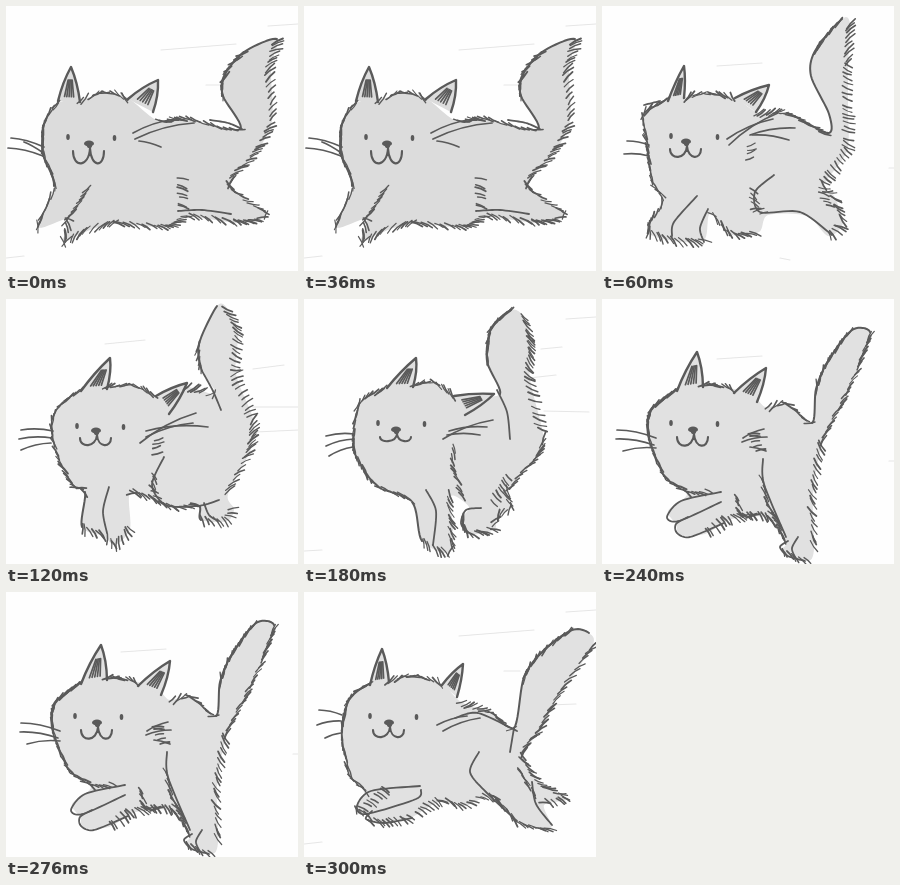
An HTML page with a canvas that plays this animation: 292x265 px, repeating every 0.36 s.

```html
<!DOCTYPE html>
<html lang="en">
<head>
<meta charset="utf-8">
<title>Running cat</title>
<style>
html, body { margin: 0; width: 100%; height: 100%; overflow: hidden; background: #fefefe; }
canvas { display: block; }
</style>
</head>
<body>
<canvas id="stage" width="292" height="265"></canvas>
<script>
const ctx = document.getElementById('stage').getContext('2d');
const INK = '#5a5a5a', STEP = 60, PER = 10;
let coat, shape, seed;

const nums = s => s.split(' ').map(Number);
const mix = (a, b, t) => a + (b - a) * t;
const random = () => (seed = seed * 16807 % 2147483647) / 2147483647;

// Smooth curve through x y pairs, PER points for each span
function curve(text, closed) {
  const v = nums(text), n = v.length / 2, out = [];
  const at = i => {
    const k = closed ? (i + n) % n : Math.max(0, Math.min(n - 1, i));
    return [v[2 * k], v[2 * k + 1]];
  };
  for (let i = 0; i < (closed ? n : n - 1); i++) {
    const [a, b, c, d] = [at(i - 1), at(i), at(i + 1), at(i + 2)];
    for (let s = 0; s < PER; s++) {
      const t = s / PER, u = 1 - t;
      out.push([0, 1].map(k =>
        u * u * u * b[k] + 3 * u * u * t * (b[k] + (c[k] - a[k]) / 7) +
        3 * u * t * t * (c[k] - (d[k] - b[k]) / 7) + t * t * t * c[k]));
    }
  }
  if (!closed) out.push(at(n - 1));
  return out;
}

function trace(points) {
  ctx.beginPath();
  points.forEach(p => ctx.lineTo(...p));
}

function stroke(points, width = 1.8, color = INK) {
  trace(points);
  ctx.lineWidth = width;
  ctx.strokeStyle = color;
  ctx.stroke();
}

function body(color, text) {
  coat = color;
  shape = curve(text, true);
  trace(shape);
  ctx.fillStyle = coat;
  ctx.fill();
}

// Part of the body outline between two of its points
const part = (from, to) => shape.slice(from * PER, to * PER + 1);
const edge = (from, to) => stroke(part(from, to), 2);
const line = text => stroke(curve(text));
const streak = (x, y, x2, y2) => stroke([[x, y], [x2, y2]], 1.2, '#e6e6e6');

// Hairs along a curve, turned from its direction by a lean in degrees
function hairs(points, lean, end, size) {
  let gap = 0;
  ctx.strokeStyle = INK;
  for (let i = 1; i < points.length; i++) {
    const [x, y] = points[i], dx = x - points[i - 1][0], dy = y - points[i - 1][1];
    gap -= Math.hypot(dx, dy);
    if (gap > 0) continue;
    gap += 3.6 + random() * 1.8;
    const turn = mix(lean, end, i / points.length) + random() * 18 - 9;
    const angle = Math.atan2(dy, dx) + turn * Math.PI / 180;
    const half = size * (0.33 + random() * 0.22);
    const hx = Math.cos(angle) * half, hy = Math.sin(angle) * half;
    const px = x + random() * 2 - 1, py = y + random() * 2 - 1;
    ctx.lineWidth = 1.1 + random() * 0.8;
    ctx.beginPath();
    ctx.moveTo(px - hx, py - hy);
    ctx.quadraticCurveTo(px + hy * 0.2, py - hx * 0.2, px + hx, py + hy);
    ctx.stroke();
  }
}
const fur = (from, to, lean, end = lean) => hairs(part(from, to), lean, end, 12.5);
const tuft = (text, lean) => hairs(curve(text), lean, lean, 11);

function whisker(x, y, x2, y2) {
  const bow = (x2 - x) * 0.1 * Math.sign(y - y2 || 1);
  ctx.beginPath();
  ctx.moveTo(x, y);
  ctx.quadraticCurveTo((x + x2) / 2 - Math.abs(y2 - y) * 0.1, (y + y2) / 2 - Math.abs(bow), x2, y2);
  ctx.lineWidth = 1.7;
  ctx.strokeStyle = INK;
  ctx.stroke();
}

// Base, tip, base
function ear(ax, ay, tx, ty, bx, by) {
  const cx = (ax + tx + bx) / 3, cy = (ay + ty + by) / 3;
  const bulge = (p, q, c) => (p + q) / 2 + ((p + q) / 2 - c) * 0.35;
  ctx.beginPath();
  ctx.moveTo(ax, ay);
  ctx.quadraticCurveTo(bulge(ax, tx, cx), bulge(ay, ty, cy), tx, ty);
  ctx.quadraticCurveTo(bulge(bx, tx, cx), bulge(by, ty, cy), bx, by);
  ctx.fillStyle = coat;
  ctx.fill();
  ctx.lineWidth = 2.4;
  ctx.strokeStyle = INK;
  ctx.stroke();
  for (let k = 0.25; k < 0.8; k += 0.12) {
    const x = mix(ax, bx, k), y = mix(ay, by, k);
    stroke([0.14, 0.62].map(t => [mix(x, tx, t), mix(y, ty, t)]), 1.7);
  }
}

function dot(x, y, rx, ry) {
  ctx.beginPath();
  ctx.ellipse(x, y, rx, ry, 0, 0, 7);
  ctx.fillStyle = INK;
  ctx.fill();
}

// Left eye, nose, depth of the smile
function face(ex, ey, nx, ny, depth) {
  dot(ex, ey, 1.8, 3);
  dot(ex + 46.5, ey + 1, 1.8, 3);
  dot(nx, ny - 0.5, 5, 3);
  dot(nx + 0.5, ny + 1.5, 2.6, 2.6);
  const y = ny + 7, low = y + depth;
  ctx.beginPath();
  ctx.moveTo(nx - 16, y);
  ctx.bezierCurveTo(nx - 16, low, nx, low, nx + 1, ny + 4);
  ctx.bezierCurveTo(nx + 2, low, nx + 15, low, nx + 15, y);
  ctx.lineWidth = 2.1;
  ctx.strokeStyle = INK;
  ctx.stroke();
}

function wind() {
  streak(155, 44, 230, 38);
  streak(262, 20, 292, 18);
  streak(200, 79, 216, 79);
  streak(0, 252, 18, 250);
}

function crouch() {
  wind();
  body('#dcdcdc', '52 97 38 118 37 148 48 180 32 221 62 213 57 236 76 227 108 218 160 221 184 211 235 217 260 208 225 179 250 147 266 115 265 62 271 33 238 46 218 70 217 90 234 123 180 113 152 115 122 92 100 87 74 94');
  ear(52, 95, 65, 61, 74, 96);
  ear(122, 93, 152, 74, 147, 106);
  fur(0, 4, 0);
  fur(5, 8, -30);
  fur(8, 12, 25);
  fur(12, 13, -15);
  fur(13, 17, 18, 60);
  fur(18, 20, 8);
  fur(21, 23, 15);
  fur(24, 26, 35, -40);
  tuft('82 182 60 216', 10);
  tuft('176 172 177 203', -70);
  edge(17, 21);
  edge(1, 3);
  line('172 205 196 204 225 208');
  line('236 123 222 117 204 114');
  whisker(5, 132, 38, 141);
  whisker(2, 142, 37, 150);
  whisker(18, 136, 36, 146);
  whisker(127, 127, 170, 113);
  whisker(129, 133, 188, 117);
  whisker(133, 135, 155, 141);
  face(62, 131, 83, 138, 17);
}

function reach() {
  streak(115, 60, 160, 57);
  streak(287, 162, 292, 162);
  streak(178, 252, 188, 254);
  body('#e1e1e1', '65 94 42 108 45 138 50 175 60 194 45 225 72 235 102 234 108 208 130 229 157 226 166 209 205 210 226 230 241 217 232 190 222 179 245 145 246 105 246 60 248 18 240 13 213 45 209 70 227 108 226 127 185 107 155 106 133 92 105 87 83 91');
  ear(66, 95, 82, 60, 82, 92);
  ear(133, 92, 167, 79, 154, 106);
  fur(0, 5, -10);
  fur(5, 7, 45);
  fur(8, 10, 10, 35);
  fur(13, 14, 75);
  fur(14, 16, -40);
  fur(16, 19, -80, -65);
  fur(19, 20, 40);
  fur(21, 22, -5);
  fur(25, 27, 0, -45);
  fur(28, 30, 40, -45);
  tuft('152 185 153 200 164 209', -50);
  tuft('150 138 148 154', 65);
  tuft('221 188 228 200', -45);
  edge(21, 26);
  line('42 99 58 95');
  line('95 190 72 216 70 230');
  line('106 203 98 222 102 236');
  line('172 169 153 186 158 206 198 206 230 229');
  whisker(25, 135, 47, 139);
  whisker(22, 148, 47, 150);
  whisker(127, 139, 176, 107);
  whisker(125, 133, 171, 113);
  whisker(148, 129, 193, 122);
  whisker(150, 129, 187, 134);
  face(69, 130, 84, 136, 11);
}

function gather() {
  streak(99, 45, 139, 41);
  streak(247, 70, 278, 66);
  streak(247, 108, 292, 108);
  streak(250, 133, 292, 131);
  body('#e1e1e1', '75 91 48 115 47 145 65 184 79 193 76 228 97 237 109 246 124 230 124 195 148 201 170 209 193 207 195 221 221 222 228 210 222 195 245 150 247 120 230 75 232 32 221 9 211 7 193 45 196 72 210 95 181 88 163 98 150 97 128 87 102 87');
  ear(75, 92, 104, 59, 101, 90);
  ear(150, 97, 181, 84, 163, 115);
  fur(0, 4, -5, -15);
  fur(5, 7, 40);
  fur(7, 8, -68);
  fur(9, 12, 20);
  fur(13, 15, 45, 75);
  fur(16, 18, 20, 50);
  fur(18, 19, 80);
  fur(19, 21, -80, -20);
  fur(23, 24, 15);
  fur(25, 26, -45);
  fur(28, 30, 30, -30);
  tuft('149 176 147 190 153 201', -40);
  tuft('152 139 151 155', 70);
  edge(22, 24);
  line('196 72 207 92 215 111');
  line('103 188 97 212 101 234');
  line('158 158 146 186 160 206 192 207 213 201');
  line('198 204 203 216 212 222');
  edge(4, 5);
  edge(12, 13);
  whisker(15, 131, 47, 132);
  whisker(13, 140, 46, 139);
  whisker(15, 151, 45, 144);
  whisker(134, 144, 190, 114);
  whisker(140, 138, 187, 124);
  whisker(140, 132, 202, 128);
  face(71, 127, 90, 132, 10);
}

function turn() {
  streak(262, 20, 292, 18);
  streak(237, 50, 258, 48);
  streak(225, 79, 252, 76);
  streak(240, 112, 285, 113);
  streak(0, 252, 18, 251);
  body('#e0e0e0', '82 89 55 105 50 149 70 185 108 203 118 242 145 254 149 230 147 197 165 208 158 220 165 235 190 231 193 218 207 209 205 191 234 157 239 135 226 80 228 45 220 18 207 11 187 30 183 62 196 95 165 97 151 97 132 84 110 85');
  ear(83, 89, 112, 59, 109, 88);
  ear(150, 97, 190, 95, 161, 116);
  fur(0, 1, -20);
  fur(1, 4, 5);
  fur(5, 6, 40);
  fur(6, 8, -30);
  fur(10, 13, 0, 65);
  fur(13, 15, -30);
  fur(15, 17, 15);
  fur(17, 20, -65, -20);
  fur(21, 23, -8, 8);
  fur(26, 28, 35, -30);
  tuft('151 149 148 164 158 197', -25);
  tuft('189 206 205 178', -65);
  edge(21, 24);
  edge(4, 5);
  line('193 91 203 113 206 140');
  line('122 191 132 212 129 246');
  line('177 209 162 211 157 224 163 234');
  whisker(22, 137, 50, 135);
  whisker(22, 147, 50, 140);
  whisker(25, 157, 49, 148);
  whisker(139, 140, 189, 121);
  whisker(145, 132, 183, 128);
  whisker(143, 136, 176, 136);
  face(74, 124, 92, 131, 6);
}

function spring() {
  streak(115, 60, 160, 57);
  streak(287, 162, 292, 162);
  body('#e1e1e1', '74 91 48 113 47 140 63 178 85 195 66 212 74 225 78 236 103 235 130 220 165 219 184 243 180 252 205 262 212 250 211 195 220 146 240 105 260 60 268 33 250 31 226 62 214 90 210 124 185 105 164 108 154 100 132 90 101 86');
  ear(75, 92, 95, 53, 101, 88);
  ear(132, 94, 164, 69, 155, 103);
  fur(0, 4, -5);
  fur(8, 9, 84);
  fur(9, 10, 50);
  fur(10, 11, 10);
  fur(12, 13, 30);
  fur(14, 16, -30, -40);
  fur(16, 19, 14);
  fur(20, 22, -10);
  fur(23, 25, 0, -40);
  fur(27, 28, 45, -30);
  tuft('135 197 139 216 153 217', -20);
  tuft('160 179 165 204 179 230', -15);
  tuft('151 133 158 151', -75);
  tuft('88 195 110 193', 30);
  edge(19, 23);
  edge(0, 2);
  line('119 193 79 202 65 218 77 222 119 203');
  line('86 218 74 225 75 234 88 238 122 224');
  line('161 160 162 185 184 238');
  line('186 242 178 248 186 257 203 262');
  line('196 238 190 249 193 258');
  whisker(15, 131, 54, 139);
  whisker(14, 140, 52, 146);
  whisker(21, 152, 54, 149);
  whisker(141, 139, 162, 130);
  whisker(140, 143, 165, 138);
  whisker(148, 148, 164, 152);
  face(69, 124, 91, 131, 12);
}

function stretch() {
  wind();
  streak(245, 113, 272, 112);
  body('#e1e1e1', '65 92 45 108 38 140 45 181 60 200 52 216 64 223 66 230 100 229 135 210 160 214 188 205 214 231 247 236 240 213 263 207 236 190 219 163 237 138 252 108 288 55 285 41 268 38 240 58 220 85 210 136 186 120 157 110 138 92 110 84 85 88');
  ear(66, 93, 78, 57, 85, 90);
  ear(138, 93, 159, 72, 153, 105);
  fur(0, 4, 0, -10);
  fur(5, 6, 20);
  fur(7, 9, 40, 70);
  fur(9, 11, 20, 50);
  fur(11, 13, 0, 25);
  fur(14, 15, 50);
  fur(15, 17, -20);
  fur(17, 20, 18);
  fur(22, 24, -12);
  fur(25, 27, 5, -50);
  fur(28, 30, 35, -40);
  tuft('57 219 84 197', 70);
  tuft('214 178 231 204', 0);
  edge(21, 25);
  edge(0, 2);
  line('210 136 206 160');
  line('116 194 67 199 53 214 62 222 112 207 117 198');
  line('68 219 62 227 80 231 108 226');
  line('175 160 166 180 182 200 213 229');
  line('228 190 232 212 248 233');
  whisker(15, 118, 38, 123);
  whisker(13, 133, 37, 129);
  whisker(21, 146, 37, 141);
  whisker(133, 133, 163, 124);
  whisker(139, 139, 176, 126);
  line('151 126 174 121 213 139');
  face(66, 124, 85, 131, 10);
}

const gait = [crouch, reach, gather, turn, spring, stretch];
ctx.lineCap = ctx.lineJoin = 'round';

function tick() {
  const i = Math.floor(performance.now() / STEP) % gait.length;
  seed = i * 977 + 31;
  ctx.fillStyle = '#fefefe';
  ctx.fillRect(0, 0, 292, 265);
  gait[i]();
  requestAnimationFrame(tick);
}
tick();
</script>
</body>
</html>
```
